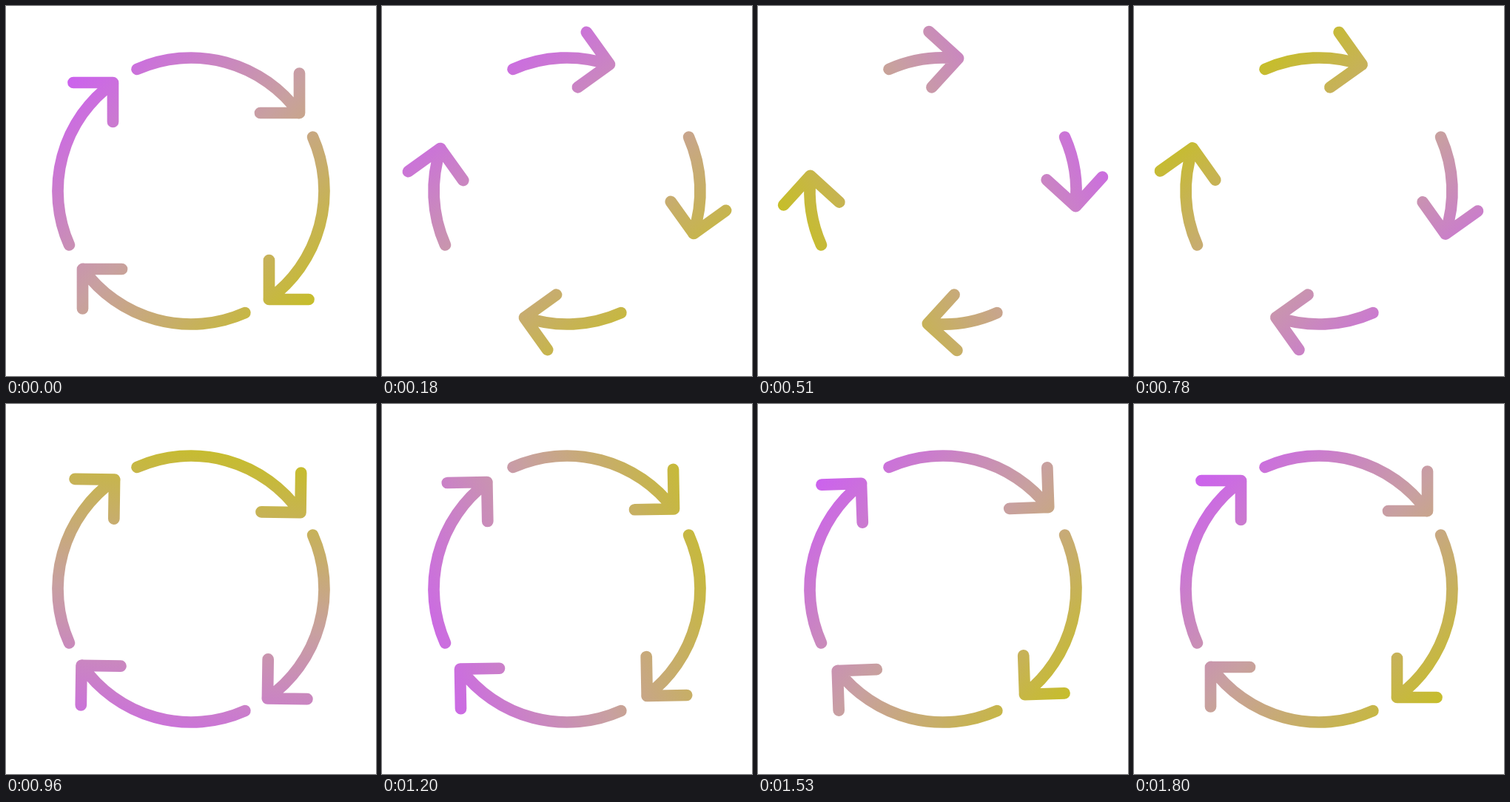
An HTML page with a canvas for the animation above (2.83 s loop, 500 px wide and 500 px high).

```html
<!DOCTYPE html>
<html lang="en">
<head>
<meta charset="utf-8">
<title>Circling arrows</title>
<style>
html, body { margin: 0; width: 100%; height: 100%; overflow: hidden; background: #fff; }
canvas { display: block; width: 100vmin; height: 100vmin; }
</style>
</head>
<body>
<canvas id="stage" width="500" height="500"></canvas>
<script>
const ctx = document.getElementById('stage').getContext('2d');
const LOOP = 2830, END = 1800, STEP = 30;
const RAD = Math.PI / 180;
const CENTER = 250, RADIUS = 180, STROKE = 15.7;
const TAIL = -113.9, TIP = -35.8;
const HEAD = [[146.5, -159], [146.5, -105.5], [93.5, -105.5]];
const SPAN = 230;

function bezier(x1, y1, x2, y2) {
  const at = (a, b, s) => 3 * (1 - s) * (1 - s) * s * a + 3 * (1 - s) * s * s * b + s * s * s;
  return x => {
    let lo = 0, hi = 1;
    for (let i = 0; i < 30; i++) {
      const mid = (lo + hi) / 2;
      if (at(x1, x2, mid) < x) lo = mid; else hi = mid;
    }
    return at(y1, y2, (lo + hi) / 2);
  };
}

const snapOut = bezier(0.333, 0, 0, 1);
const snapIn = bezier(1, 0, 0.667, 1);
const smooth = x => x * x * (3 - 2 * x);

// Swing of the arrow heads in degrees: [time, value, easing towards it]
const SWING = [
  [0, 0], [480, -47.75, snapOut], [960, 0.8, snapIn],
  [1410, -2.6, smooth], [1800, 0, smooth]
];

function swing(t) {
  const i = Math.max(1, SWING.findIndex(k => t <= k[0]));
  const [t0, v0] = SWING[i - 1], [t1, v1, ease] = SWING[i];
  return v0 + (v1 - v0) * ease((t - t0) / (t1 - t0));
}

// Monotone cubic curve through [time, value] points, level at both ends
function curve(points) {
  const slope = i => (points[i + 1][1] - points[i][1]) / (points[i + 1][0] - points[i][0]);
  const tangent = points.map((p, i) => {
    if (i === 0 || i === points.length - 1) return 0;
    const a = slope(i - 1), b = slope(i);
    return a * b > 0 ? 2 * a * b / (a + b) : 0;
  });
  return t => {
    let i = 0;
    while (i < points.length - 2 && t > points[i + 1][0]) i++;
    const [t0, v0] = points[i], [t1, v1] = points[i + 1];
    const h = t1 - t0, s = (t - t0) / h;
    return v0 + (v1 - v0) * smooth(s)
      + h * tangent[i] * s * (1 - s) * (1 - s)
      - h * tangent[i + 1] * s * s * (1 - s);
  };
}

const gradientAngle = curve([
  [0, 45], [180, 52], [510, 151], [780, 230], [1200, 341], [1530, 399], [1800, 405]
]);
const gradientShift = curve([[0, 0], [180, 0], [510, 25], [780, 45], [1200, 0], [1800, 0]]);

function paint(t) {
  const angle = gradientAngle(t) * RAD, shift = gradientShift(t);
  const ux = Math.cos(angle), uy = Math.sin(angle);
  const from = -SPAN - shift, to = SPAN - shift;
  const g = ctx.createLinearGradient(
    CENTER + ux * from, CENTER + uy * from, CENTER + ux * to, CENTER + uy * to);
  g.addColorStop(0, 'rgb(204,96,240)');
  g.addColorStop(0.5, 'rgb(200,160,160)');
  g.addColorStop(1, 'rgb(198,190,40)');
  return g;
}

function addArrow(turn, phi) {
  const start = (TAIL + turn) * RAD, end = (TIP + phi + turn) * RAD;
  ctx.moveTo(CENTER + RADIUS * Math.cos(start), CENTER + RADIUS * Math.sin(start));
  ctx.arc(CENTER, CENTER, RADIUS, start, end);
  const c = Math.cos((turn + phi) * RAD), s = Math.sin((turn + phi) * RAD);
  HEAD.forEach(([x, y], i) => {
    const px = CENTER + x * c - y * s, py = CENTER + x * s + y * c;
    if (i) ctx.lineTo(px, py); else ctx.moveTo(px, py);
  });
}

function draw(ms) {
  const t = Math.min(END, Math.floor((ms % LOOP) / STEP) * STEP);
  const phi = swing(t);
  ctx.fillStyle = '#fff';
  ctx.fillRect(0, 0, 500, 500);
  ctx.lineWidth = STROKE;
  ctx.lineCap = ctx.lineJoin = 'round';
  ctx.strokeStyle = paint(t);
  ctx.beginPath();
  for (let turn = 0; turn < 360; turn += 90) addArrow(turn, phi);
  ctx.stroke();
}

const begin = performance.now();
function tick() {
  draw(performance.now() - begin);
  requestAnimationFrame(tick);
}
tick();
</script>
</body>
</html>
```
